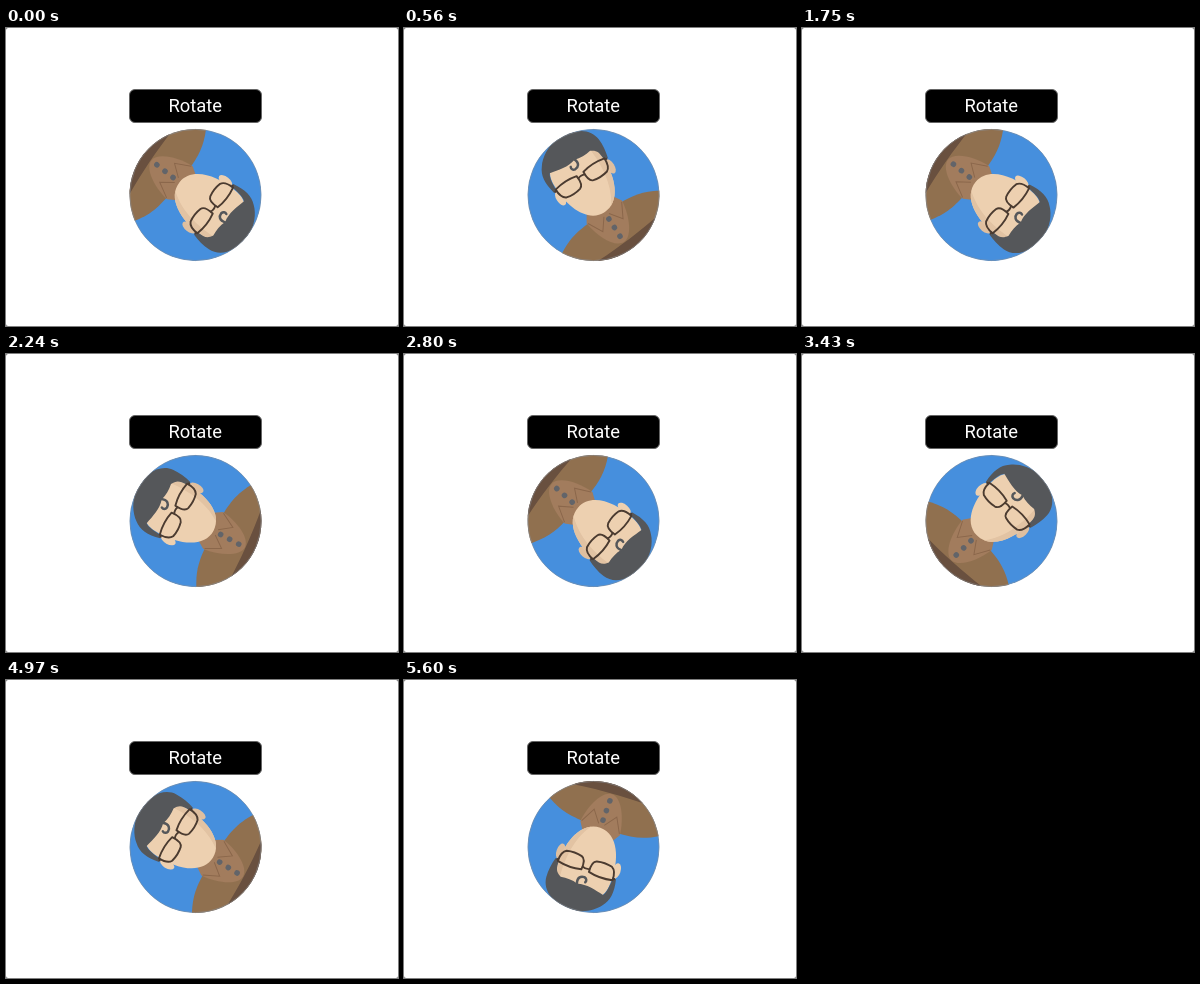
Recreate the animation shown at these times as an HTML page. Size 392 px wide and 298 px high, loop 5.67 s.

```html
<!DOCTYPE html>
<html lang="en">
<head>
<meta charset="utf-8">
<title>Rotate</title>
<style>
  html, body { margin: 0; width: 100%; height: 100%; overflow: hidden; background: #777; }
  svg { display: block; width: 392px; height: 298px; }
  .label { font: 18.4px Roboto, sans-serif; fill: #fff; text-anchor: middle; }
</style>
</head>
<body>
<svg viewBox="0 0 392 298">
  <defs>
    <clipPath id="disc"><circle r="66"/></clipPath>
    <clipPath id="head"><path d="M-28-28C-28-46-17-52 0-52S28-46 28-28C29-3 19 20.5 0 20.5S-29-3-28-28Z"/></clipPath>
  </defs>

  <rect width="392" height="298" rx="2.5" fill="#fff"/>
  <rect x="123.5" y="61.5" width="132" height="33" rx="5.5" stroke="#666"/>
  <text class="label" x="189.2" y="84.2">Rotate</text>

  <g transform="translate(189.5 167)">
    <g id="avatar" clip-path="url(#disc)">
      <circle r="66" fill="#468fdd"/>

      <!-- jacket and shirt -->
      <path d="M-70 40C-48 24-36 22-18 21H18C36 22 48 24 70 40V70H-70Z" fill="#90704f"/>
      <path d="M-46 58C-8 58 20 56 56 50V70H-46Z" fill="#69503f"/>
      <path d="M-21 20C-19 38-10 56 0 56S19 38 21 20L14 9H-14Z" fill="#a27c5d"/>
      <g fill="none" stroke="#8b674b" stroke-width="1">
        <path d="M-20 21L-12 36L-3 24"/>
        <path d="M20 21L12 36L3 24"/>
      </g>
      <g fill="#626469">
        <circle cy="28.5" r="2.8"/>
        <circle cy="38.7" r="2.8"/>
        <circle cy="49" r="2.8"/>
      </g>

      <!-- head -->
      <ellipse cx="-29.5" cy="-15" rx="4.2" ry="8" fill="#edd0b0"/>
      <ellipse cx="29.5" cy="-15" rx="4.2" ry="8" fill="#dfbf9f"/>
      <g clip-path="url(#head)">
        <rect x="-32" y="-54" width="64" height="78" fill="#edd0b0"/>
        <path d="M20-54C25-22 22 4 5 24H34V-54Z" fill="#e2c3a3"/>
      </g>
      <path d="M-32-23C-35-36-34-45-28-52C-23-59-12-66 0-66.5C8-66 14-66 19-63C28-60 34-52 34.500-44C35-37 34-30 32-23L28-25C28-33 27-36 21-39C15-38 9-38 3-40C-6-37-16-40-25-42C-28-38-28-32-29-23Z" fill="#55575a"/>
      <path d="M3-41C6-34 2-31.500-1.500-31.500C-4-32-5-34-4-36" fill="none" stroke="#55575a" stroke-width="2.5" stroke-linecap="round"/>

      <!-- glasses -->
      <g fill="none" stroke="#4b3b30" stroke-width="1.9" stroke-linejoin="round">
        <path d="M-29-25Q-16-28-4-25Q-3-14-8-12.500Q-16-10.500-24-12.500Q-29-15-29-25Z"/>
        <path d="M29-25Q16-28 4-25Q3-14 8-12.500Q16-10.500 24-12.500Q29-15 29-25Z"/>
        <path d="M-4-22Q0-24 4-22M-29-24L-31-23M29-24L31-23"/>
      </g>
    </g>
    <circle r="65.6" fill="none" stroke="#8c9299" stroke-opacity=".6" stroke-width=".9"/>
  </g>
</svg>
<script>
  const LOOP = 5670, STEP = 70;
  // time in ms, total clockwise turn in degrees
  const turns = [
    [0, 128], [1190, 551.5], [1750, 849], [2800, 1211.5],
    [4130, 1791], [4970, 2102], [5600, 2359.5]
  ];
  const avatar = document.getElementById('avatar');
  const start = performance.now();

  function angleAt(t) {
    const i = Math.max(1, turns.findIndex(([end]) => t <= end));
    const [t0, a0] = turns[i - 1], [t1, a1] = turns[i];
    return a0 + (a1 - a0) * (t - t0) / (t1 - t0);
  }

  function draw(now) {
    const t = Math.max(0, now - start) % LOOP;
    const held = Math.floor(t / STEP) * STEP;
    avatar.setAttribute('transform', `rotate(${angleAt(held) % 360})`);
    requestAnimationFrame(draw);
  }
  draw(start);
</script>
</body>
</html>
```
